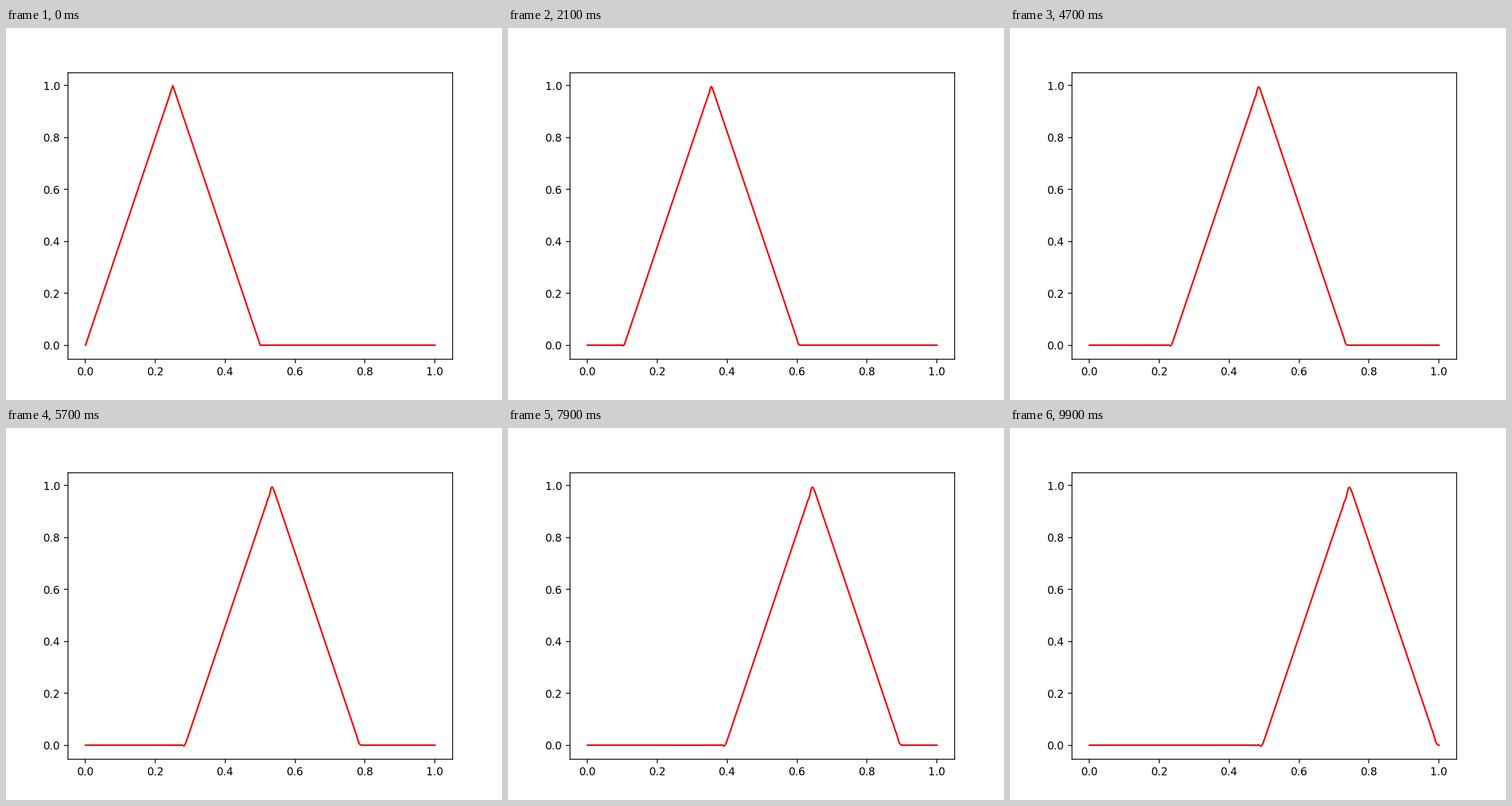
Animation, 864 px wide and 648 px high, one loop 10000 ms. Source, as a matplotlib script:

```python
import numpy as np
import matplotlib.pyplot as plt
from matplotlib.animation import FuncAnimation

CELLS = 2000
CFL = 0.5
FRAMES = 100
STEPS = 20  # time steps per frame, moving the wave by 0.005


def triangle(x):
    return np.clip(1 - np.abs(x - 0.25) / 0.25, 0, None)


def lax_wendroff(u):
    new = u.copy()
    left, mid, right = u[:-2], u[1:-1], u[2:]
    new[1:-1] = mid - CFL / 2 * (right - left) + CFL**2 / 2 * (right - 2 * mid + left)
    return new


def leapfrog(old, u):
    new = u.copy()
    new[1:-1] = old[1:-1] - CFL * (u[2:] - u[:-2])
    return new


def advect(u):
    """Solve u_t + u_x = 0 with fixed ends, one row per frame."""
    rows = [u]
    old, u = u, lax_wendroff(u)
    for step in range(1, STEPS * (FRAMES - 1) + 1):
        if step % STEPS == 0:
            rows.append(u)
        old, u = u, leapfrog(old, u)
    return np.array(rows)


x = np.linspace(0, 1, CELLS + 1)
waves = advect(triangle(x))

fig, ax = plt.subplots(figsize=(6.4, 4.8), dpi=135)
line, = ax.plot(x, waves[0], color="red")

low, high = waves.min(), waves.max()
pad = 0.05 * (high - low)
ax.set_xlim(-0.05, 1.05)
ax.set_ylim(low - pad, high + pad)


def update(i):
    line.set_ydata(waves[i])
    return line,


anim = FuncAnimation(fig, update, frames=FRAMES, interval=100, repeat=True, repeat_delay=0)
plt.show()
```
